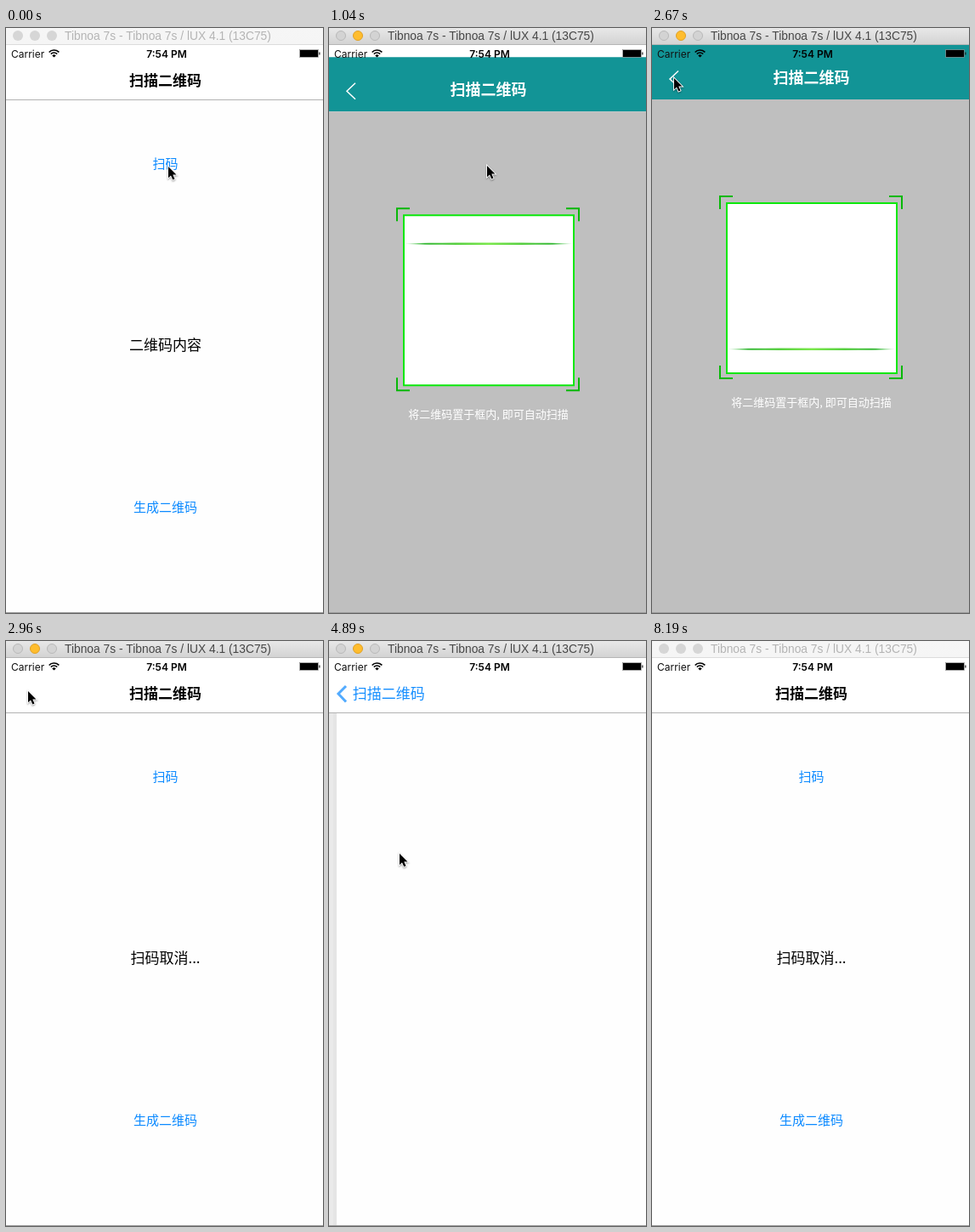
Write an HTML page with a canvas that moves like this. It is 373x688 px and loops after 8270 ms.

```html
<!DOCTYPE html>
<html lang="zh-CN">
<head>
<meta charset="utf-8">
<title>扫描二维码</title>
<style>
html, body { margin: 0; width: 100%; height: 100%; overflow: hidden; background: #fff; }
canvas { display: block; width: 373px; height: 688px; }
</style>
</head>
<body>
<canvas id="stage" width="373" height="688"></canvas>
<script>
const ctx = document.getElementById('stage').getContext('2d');
const W = 373, H = 688, LOOP = 8270, TICK = 147.9;
const BLUE = '#0c8aff', TEAL = '#129496', PAPER = '#fefefe';
const CJK = '"Noto Sans CJK SC", "Noto Sans CJK", sans-serif';

const MODAL_IN = 720, MODAL_OUT = 20 * TICK;
const PUSH = 4574, POP = 5759;

// Pointer tip: [tick, x, y]
const POINTER = [
  [0, 191, 163], [2, 186, 162], [7, 186, 162], [11, 171, 220], [13, 171, 220],
  [17, 26, 59], [20, 26, 59], [22, 40, 90], [27, 187, 574], [29, 186, 566],
  [31, 186, 566], [33, 83, 250], [35, 24, 62], [39, 24, 62], [40, 54.5, 64], [44, 390, 90]
];

const clamp = v => Math.min(1, Math.max(0, v));

// Critically damped spring from 0 to 1
function spring(ms) {
  const x = 0.01826 * Math.max(0, ms);
  return 1 - (1 + x) * Math.exp(-x);
}

function rect(x, y, w, h, color) {
  ctx.fillStyle = color;
  ctx.fillRect(x, y, w, h);
}

function text(str, x, y, font, color, align = 'center') {
  ctx.font = font;
  ctx.fillStyle = color;
  ctx.textAlign = align;
  ctx.fillText(str, x, y);
}

function line(points, color, width) {
  ctx.beginPath();
  points.forEach(([x, y]) => ctx.lineTo(x, y));
  ctx.strokeStyle = color;
  ctx.lineWidth = width;
  ctx.stroke();
}

function layer(dx, dy, alpha, draw) {
  ctx.save();
  ctx.translate(dx, dy);
  ctx.globalAlpha = alpha;
  draw();
  ctx.restore();
}

function titleBar(active) {
  const fill = ctx.createLinearGradient(0, 0, 0, 20);
  fill.addColorStop(0, active ? '#e8e8e8' : '#f6f6f6');
  fill.addColorStop(1, active ? '#d2d2d2' : '#f5f5f5');
  rect(0, 0, W, 20, fill);
  rect(0, 19, W, 1, active ? '#b6b6b6' : '#dcdcdc');
  [14, 34, 54].forEach((x, i) => {
    const amber = active && i === 1;
    ctx.beginPath();
    ctx.arc(x, 9, active ? 5.5 : 6, 0, 7);
    ctx.fillStyle = amber ? '#ffbd2e' : active ? '#d3d3d3' : '#d6d6d6';
    ctx.fill();
    if (active) {
      ctx.strokeStyle = amber ? '#e0a025' : '#b9b9b9';
      ctx.lineWidth = 1;
      ctx.stroke();
    }
  });
  text('Tibnoa 7s - Tibnoa 7s / lUX 4.1 (13C75)', 69, 14,
    '13.8px "Liberation Sans", sans-serif', active ? '#474747' : '#b4b4b4', 'left');
}

function statusBar() {
  text('Carrier', 6, 34.5, '12px Inter, sans-serif', '#111', 'left');
  text('7:54 PM', 189, 34.5, '600 12px Inter, sans-serif', '#000');
  [8, 5].forEach(r => {
    ctx.beginPath();
    ctx.arc(56.5, 34, r, -Math.PI * 0.76, -Math.PI * 0.24);
    ctx.strokeStyle = '#000';
    ctx.lineWidth = 1.7;
    ctx.stroke();
  });
  ctx.beginPath();
  ctx.moveTo(56.5, 34.5);
  ctx.arc(56.5, 34.5, 3, -Math.PI * 0.76, -Math.PI * 0.24);
  ctx.fillStyle = '#000';
  ctx.fill();
  ctx.strokeStyle = '#888';
  ctx.lineWidth = 0.7;
  ctx.strokeRect(345.5, 25.5, 22, 9);
  rect(346, 26, 21, 8, '#000');
  rect(368.3, 28.5, 1.2, 3, '#222');
}

function home(message, scanAlpha, createAlpha) {
  rect(0, 85, W, H - 85, PAPER);
  layer(0, 0, scanAlpha, () => text('扫码', 187.5, 165, '15px ' + CJK, BLUE));
  text(message, 187.5, 379, '17px ' + CJK, '#000');
  layer(0, 0, createAlpha, () => text('生成二维码', 187.5, 569, '15px ' + CJK, BLUE));
}

function navBar(pushed) {
  rect(0, 20, W, 64, '#fff');
  rect(0, 84, W, 1, '#b2b2b2');
  const x = 187.5 - 120 * pushed ** 0.92;
  layer(0, 0, clamp(1 - pushed * 4.2), () =>
    text('扫描二维码', x, 68, 'bold 17px ' + CJK, '#000'));
  layer(0, 0, pushed ** 1.4, () => text('扫描二维码', x, 68, '17px ' + CJK, BLUE));
  layer(0, 0, pushed * pushed * 0.75, () =>
    line([[20, 53], [11, 62], [20, 71.5]], BLUE, 3));
}

function detailPage(pushed) {
  const x = W * (1 - pushed);
  rect(0, 85, W, H - 85, `rgba(0,0,0,${0.08 * pushed})`);
  rect(x - 4, 85, 4, H - 85, 'rgba(0,0,0,.025)');
  rect(x, 85, W, H - 85, PAPER);
  rect(x, 85, W, H - 85, `rgba(0,0,0,${0.015 * (1 - pushed)})`);
}

function scanBeam(y) {
  const glow = ctx.createLinearGradient(89, 0, 287, 0);
  [[0, 'rgba(40,190,40,0)'], [0.12, '#35b835'], [0.5, '#7be84c'],
   [0.88, '#35b835'], [1, 'rgba(40,190,40,0)']].forEach(s => glow.addColorStop(...s));
  ctx.beginPath();
  ctx.ellipse(188, y, 99, 1.3, 0, 0, 7);
  ctx.fillStyle = glow;
  ctx.fill();
}

function scanner(ms) {
  rect(0, 20, W, 64, TEAL);
  rect(0, 84, W, H - 84, '#bfbfbf');
  text('扫描二维码', 187.5, 65, 'bold 18px ' + CJK, '#fff');
  line([[31, 50.5], [21, 60], [31, 69.5]], '#fff', 1.5);
  rect(88, 206, 200, 200, '#fff');
  ctx.strokeStyle = '#0be80b';
  ctx.lineWidth = 2;
  ctx.strokeRect(88, 206, 200, 200);
  for (const sx of [-1, 1]) for (const sy of [-1, 1]) {
    const x = 187 + sx * 107, y = 305 + sy * 107;
    line([[x - sx * 15, y], [x, y], [x, y - sy * 15]], '#08b808', 2);
  }
  // The beam sweeps down at 100 px/s and turns round at the bottom.
  scanBeam(390 - Math.abs(182 - ms * 0.1));
  text('将二维码置于框内, 即可自动扫描', 187.5, 445, '500 13px ' + CJK, '#fff');
}

function pointer(tick) {
  const next = POINTER.findIndex(key => key[0] > tick);
  if (next < 0) return;
  const [t0, x0, y0] = POINTER[next - 1], [t1, x1, y1] = POINTER[next];
  const u = (tick - t0) / (t1 - t0), k = u * u * (3 - 2 * u);
  layer(x0 + (x1 - x0) * k, y0 + (y1 - y0) * k, 1, () => {
    const arrow = new Path2D('M0 0V13.2L3 10.4L5.3 15.6L7.5 14.6L5.3 9.6H9.5Z');
    ctx.shadowColor = 'rgba(0,0,0,.4)';
    ctx.shadowBlur = 2;
    ctx.shadowOffsetY = 1;
    ctx.strokeStyle = '#fff';
    ctx.lineWidth = 1.8;
    ctx.stroke(arrow);
    ctx.shadowColor = 'transparent';
    ctx.fillStyle = '#000';
    ctx.fill(arrow);
  });
}

function render(t) {
  const tick = Math.floor(t / TICK), now = tick * TICK;
  const active = t >= 4 * TICK && t < 8190;
  const pushed = now < POP ? spring(now - PUSH) : 1 - spring(now - POP);

  rect(0, 0, W, H, PAPER);
  layer(-112 * pushed, 0, 1, () => home(
    tick < 20 ? '二维码内容' : '扫码取消...',
    tick >= 4 && tick < 20 ? 0.2 : 1,
    tick >= 31 && tick < 34 ? 0.2 : 1));
  if (pushed > 0.001) detailPage(pushed);
  navBar(pushed);

  if (now >= MODAL_IN && now < MODAL_OUT) {
    const shown = spring(now - MODAL_IN);
    layer(0, 668 * (1 - shown), 1, () => scanner(now - MODAL_IN));
  }
  statusBar();
  titleBar(active);
  rect(0, 687, W, 1, '#9c9c9c');
  if (t < 8190) pointer(tick);
}

const start = performance.now();
function frame() {
  render((performance.now() - start) % LOOP);
  requestAnimationFrame(frame);
}
frame();
</script>
</body>
</html>
```
